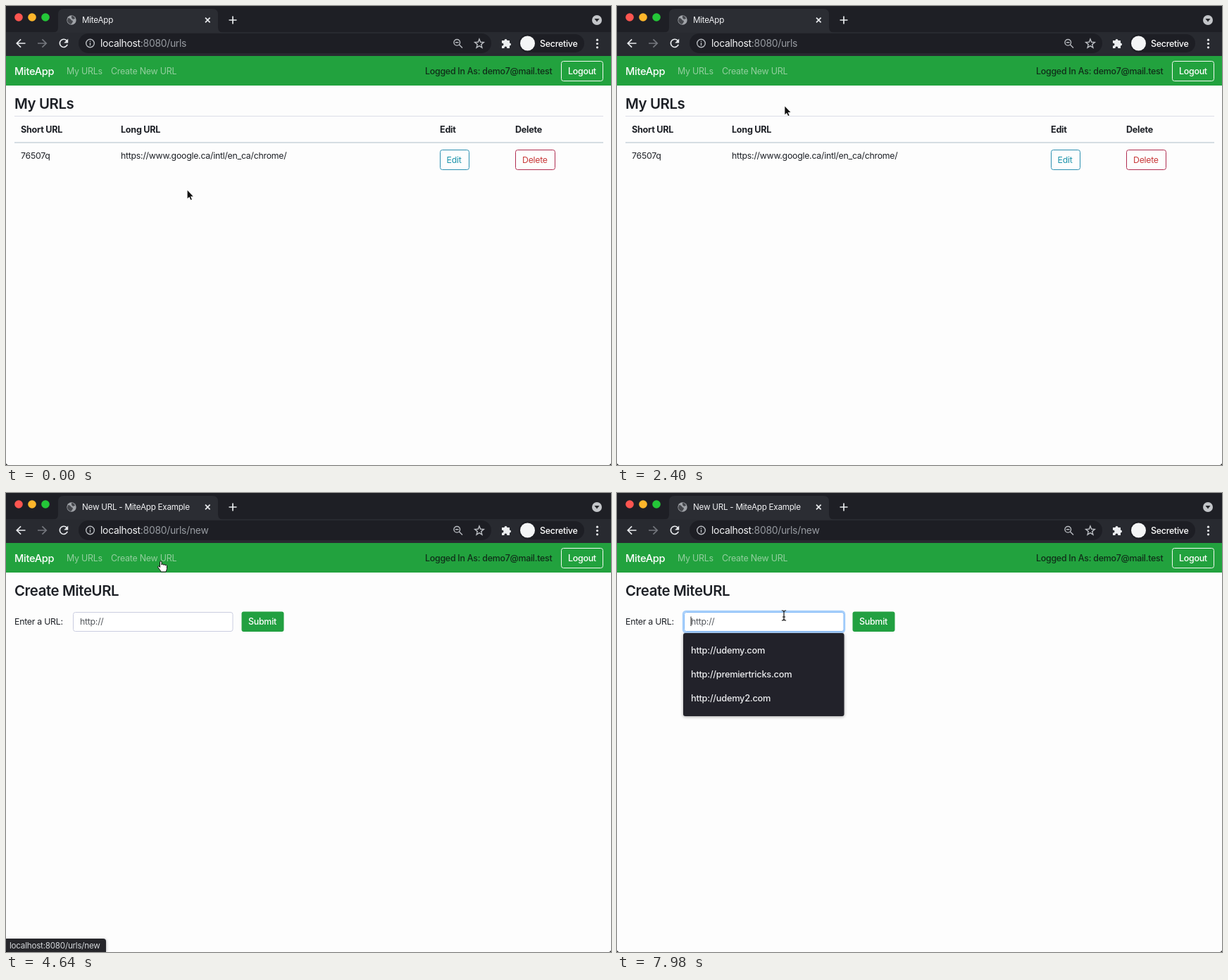
Write an HTML page that moves like this. It is 859 px wide and 652 px high and loops after 8 s.

```html
<!DOCTYPE html>
<html lang="en">
<head>
<meta charset="utf-8">
<title>My URLs</title>
<style>
html, body { margin: 0; width: 100%; height: 100%; overflow: hidden; background: #fdfdfd; }
svg { display: block; width: 859px; height: 652px; }
text { font: 400 12.3px Inter, "Open Sans", sans-serif; letter-spacing: -.02em; fill: #1d2026; white-space: pre; }
.tab, .status { font-size: 11.65px; fill: #f1f2f4; }
.status { fill: #d4d7da; }
.address { font-size: 13.9px; fill: #f3f4f5; }
.dim { fill: #979ba1; }
.brand { font-size: 14.6px; font-weight: 500; fill: #fff; }
.link { font-size: 12.4px; fill: #94cf9f; }
.link.hover { fill: #c6e8cc; }
.user { font-size: 12.4px; font-weight: 500; fill: #102e19; }
.white { fill: #fff; }
.medium { font-size: 12.4px; font-weight: 500; }
.bold { font-size: 12.6px; font-weight: 700; }
.heading { font-size: 20.4px; font-weight: 600; }
.option { font-size: 12.8px; font-weight: 500; fill: #ebecee; }
.icon { fill: none; stroke: #e8eaed; stroke-width: 1.7; }
.gray { stroke: #74777d; }
.soft { stroke: #b9bcc1; stroke-width: 1.4; }
</style>
</head>
<body>
<svg viewBox="0 0 859 652">
  <defs>
    <filter id="shadow" x="-20%" y="-20%" width="140%" height="140%">
      <feDropShadow dx="0" dy="1" stdDeviation="2" flood-opacity=".35"/>
    </filter>
  </defs>
  <rect width="859" height="652" fill="#fdfdfd"/>

  <!-- browser frame -->
  <rect width="859" height="38" fill="#1e1f25"/>
  <rect y="37" width="859" height="34" fill="#282a30"/>
  <path d="M66 38q8 0 8-8V12q0-8 8-8H293q8 0 8 8V30q0 8 8 8Z" fill="#2b2d33"/>
  <circle cx="18" cy="16" r="5.8" fill="#fc5550"/>
  <circle cx="37" cy="16" r="5.8" fill="#fdb62b"/>
  <circle cx="56" cy="16" r="5.8" fill="#24c638"/>
  <g id="globe">
    <circle cx="93" cy="20" r="6.7" fill="#a0a3a8"/>
    <path d="M88 17q3 0 4 2t3 2q0 3-3 5q-4-1-5-5ZM93 14q4 0 5 4l-3 1-2-2Z" fill="#45474c"/>
  </g>
  <path id="spinner" d="M90 14.2q2-.8 4-.3" class="icon gray" stroke-width="1"/>
  <text id="title" class="tab" x="108" y="24"></text>
  <path class="icon" d="M283 16.700l6.600 6.600m0-6.600l-6.600 6.600M322 14.500v11m-5.500-5.500h11"/>
  <circle cx="839" cy="20" r="7" fill="#c3c5c9"/>
  <path d="M835.500 18h7l-3.500 4.500Z" fill="#26272b"/>

  <rect x="103" y="39" width="586" height="28" rx="14" fill="#1d1e24"/>
  <path class="icon" d="M27.500 53H15.500m5.600-5.700L15.300 53l5.800 5.700"/>
  <path class="icon gray" d="M45 53h12m-5.600-5.700L57.200 53l-5.800 5.700"/>
  <g id="reload">
    <path class="icon" d="M86.500 49.600a5.600 5.600 0 1 0 .7 5.200"/>
    <path d="M88.200 46.500v6h-6Z" fill="#e8eaed"/>
  </g>
  <path id="stop" class="icon" d="M76.500 48l10 10m0-10l-10 10"/>
  <circle class="icon soft" cx="119.500" cy="53" r="5.800"/>
  <path class="icon soft" d="M119.500 52v4.300m0-6.800v1.500"/>
  <text class="address" x="134" y="58">localhost<tspan id="path" class="dim"></tspan></text>
  <circle class="icon soft" cx="640.300" cy="51.800" r="4.300"/>
  <path class="icon soft" d="M643.500 55l4.500 4.500M638 51.800h4.600"/>
  <path class="icon soft" d="M672 47l1.700 4.300 4.600.3-3.600 3 1.200 4.500-3.900-2.500-3.900 2.500 1.200-4.500-3.600-3 4.600-.3Z"/>
  <path d="M704 49h3.500a2 2 0 1 1 4 0h3.500v3.500a2 2 0 1 1 0 4V60h-3.800a1.900 1.900 0 1 0-3.600 0H704v-3.600a1.900 1.900 0 1 0 0-3.600Z" fill="#eceef0"/>
  <rect x="728" y="40" width="93" height="26" rx="13" fill="#1d1e24"/>
  <circle cx="740.500" cy="53" r="10.500" fill="#f4f5f6"/>
  <text class="white medium" x="758" y="58">Secretive</text>
  <g fill="#e8eaed">
    <circle cx="839.500" cy="48.200" r="1.600"/><circle cx="839.500" cy="53.500" r="1.600"/><circle cx="839.500" cy="58.800" r="1.600"/>
  </g>

  <!-- site navigation -->
  <rect y="71" width="859" height="42" fill="#22a23e"/>
  <text class="brand" x="12" y="98">MiteApp</text>
  <text class="link" x="86" y="97">My URLs</text>
  <text class="link" id="create" x="149" y="97">Create New URL</text>
  <text class="user" x="595" y="97">Logged In As: demo7@mail.test</text>
  <rect x="788.500" y="78.500" width="59" height="28" rx="3" fill="none" stroke="#f2faf3"/>
  <text class="white medium" x="798" y="97">Logout</text>

  <g id="list">
    <text class="heading" x="12" y="146">My URLs</text>
    <path d="M12 156.500H848" stroke="#dcdde8"/>
    <path d="M12 194H848" stroke="#d5dde3" stroke-width="1.800"/>
    <text class="bold" x="21" y="180">Short URL</text>
    <text class="bold" x="163" y="180">Long URL</text>
    <text class="bold" x="616" y="180">Edit</text>
    <text class="bold" x="723" y="180">Delete</text>
    <text x="21" y="217">76507q</text>
    <text x="163" y="217">https://www.google.ca/intl/en_ca/chrome/</text>
    <rect x="616.500" y="204.500" width="41" height="28" rx="3" fill="none" stroke="#2b8fb0"/>
    <text x="625.500" y="223" style="fill:#1b93ab">Edit</text>
    <rect x="723.500" y="204.500" width="56" height="28" rx="3" fill="none" stroke="#b02d50"/>
    <text x="733" y="223" style="fill:#c83838">Delete</text>
  </g>

  <g id="form">
    <text class="heading" x="12" y="146">Create MiteURL</text>
    <text x="12" y="187">Enter a URL:</text>
    <rect id="ring" x="94" y="168" width="229" height="30" rx="4" fill="none" stroke="#a9d0fb" stroke-width="2.500"/>
    <rect id="field" x="95.500" y="169.500" width="226.500" height="27" rx="3" fill="#fff" stroke="#cacde0"/>
    <text x="105" y="187" style="fill:#54585d">http://</text>
    <path id="caret" d="M105 175.500V189" stroke="#222"/>
    <rect x="334.500" y="168.500" width="60" height="28.500" rx="3" fill="#22a041"/>
    <text class="white medium" x="344" y="187">Submit</text>
    <g id="menu">
      <rect x="94" y="199" width="228.500" height="118" rx="3" fill="#222329" filter="url(#shadow)"/>
      <text class="option" x="105" y="228">http://udemy.com</text>
      <text class="option" x="105" y="262">http://premiertricks.com</text>
      <text class="option" x="105" y="296">http://udemy2.com</text>
    </g>
  </g>

  <g id="bubble">
    <path d="M0 633H138q4 0 4 4V652H0Z" fill="#25262c" filter="url(#shadow)"/>
    <text class="status" x="5" y="647">localhost:8080/urls/new</text>
  </g>
  <path d="M0 649.500q.5 2 3 2.500H0ZM859 649.500q-.5 2-3 2.500h3Z" fill="#111"/>

  <g id="pointer" stroke-linejoin="round">
    <path id="arrow" d="M.6.8V12.600L3.300 10 5.300 14.400 6.900 13.700 5 9.400H8.700Z" fill="#111" stroke="#fff" stroke-width="1.400" paint-order="stroke"/>
    <path id="hand" d="M-2.500 8.500V1.200a1.250 1.250 0 0 1 2.500 0V5a1.250 1.250 0 0 1 2.500 .4a1.250 1.250 0 0 1 2.500 .7a1.250 1.250 0 0 1 2.500 .9V10.500Q7 13 6 15H-.8Q-2 12.500-5 9Q-6 7-4.200 6.900Q-3.300 7.200-2.500 8.500Z" fill="#fff" stroke="#111"/>
    <path id="beam" d="M-2.500-7Q-.5-7 0-5.500Q.5-7 2.500-7M0-5.500V5.500M-2.500 7Q-.5 7 0 5.500Q.5 7 2.500 7M-1.500 2H1.500" fill="none" stroke="#111" stroke-width="1.200" stroke-linecap="square"/>
  </g>
</svg>
<script>
const LOOP = 8000;
const $ = id => document.getElementById(id);

// time, x, y of the pointer's hot spot
const route = [
  [0, 257, 261], [950, 257, 261], [1560, 251, 203], [1800, 248, 164],
  [2500, 236, 138], [3040, 221, 97], [4950, 221, 97],
  [5340, 234, 153], [5900, 234, 153], [6200, 237, 174], [LOOP, 237, 174]
];

const show = (id, on) => $(id).style.display = on ? "" : "none";
const within = (t, from, to) => t >= from && t < to;
const ramp = (t, from, length) => Math.min(1, Math.max(0, (t - from) / length));

function pointerAt(t) {
  const i = route.findIndex(step => step[0] > t);
  const [t0, x0, y0] = route[i - 1], [t1, x1, y1] = route[i];
  const k = (t - t0) / (t1 - t0);
  return [x0 + (x1 - x0) * k, y0 + (y1 - y0) * k];
}

function draw(t) {
  const onForm = t >= 3640, loading = within(t, 3640, 3880), focused = t >= 6840;

  show("list", !onForm);
  show("form", onForm);
  show("globe", !loading);
  show("spinner", loading);
  show("reload", !loading);
  show("stop", loading);
  $("title").textContent = !onForm ? "MiteApp" : loading ? "localhost:8080/urls/new" : "New URL - MiteApp Example";
  $("path").textContent = onForm ? ":8080/urls/new" : ":8080/urls";
  $("create").classList.toggle("hover", within(t, 3040, 3640));
  $("bubble").style.opacity = ramp(t, 3140, 100) * (1 - ramp(t, 5060, 160));

  $("ring").style.opacity = ramp(t, 6860, 150);
  $("field").setAttribute("stroke", t >= 6920 ? "#80b9f8" : "#cacde0");
  show("caret", focused && (t - 6840) % 1000 < 500);
  show("menu", t >= 7060);

  const [x, y] = pointerAt(t);
  const hand = within(t, 3030, 5030), beam = t >= 6130;
  $("pointer").setAttribute("transform", `translate(${x} ${y})`);
  show("hand", hand);
  show("beam", beam);
  show("arrow", !hand && !beam);
}

const start = performance.now();
function tick() {
  draw((performance.now() - start) % LOOP);
  requestAnimationFrame(tick);
}
tick();
</script>
</body>
</html>
```
